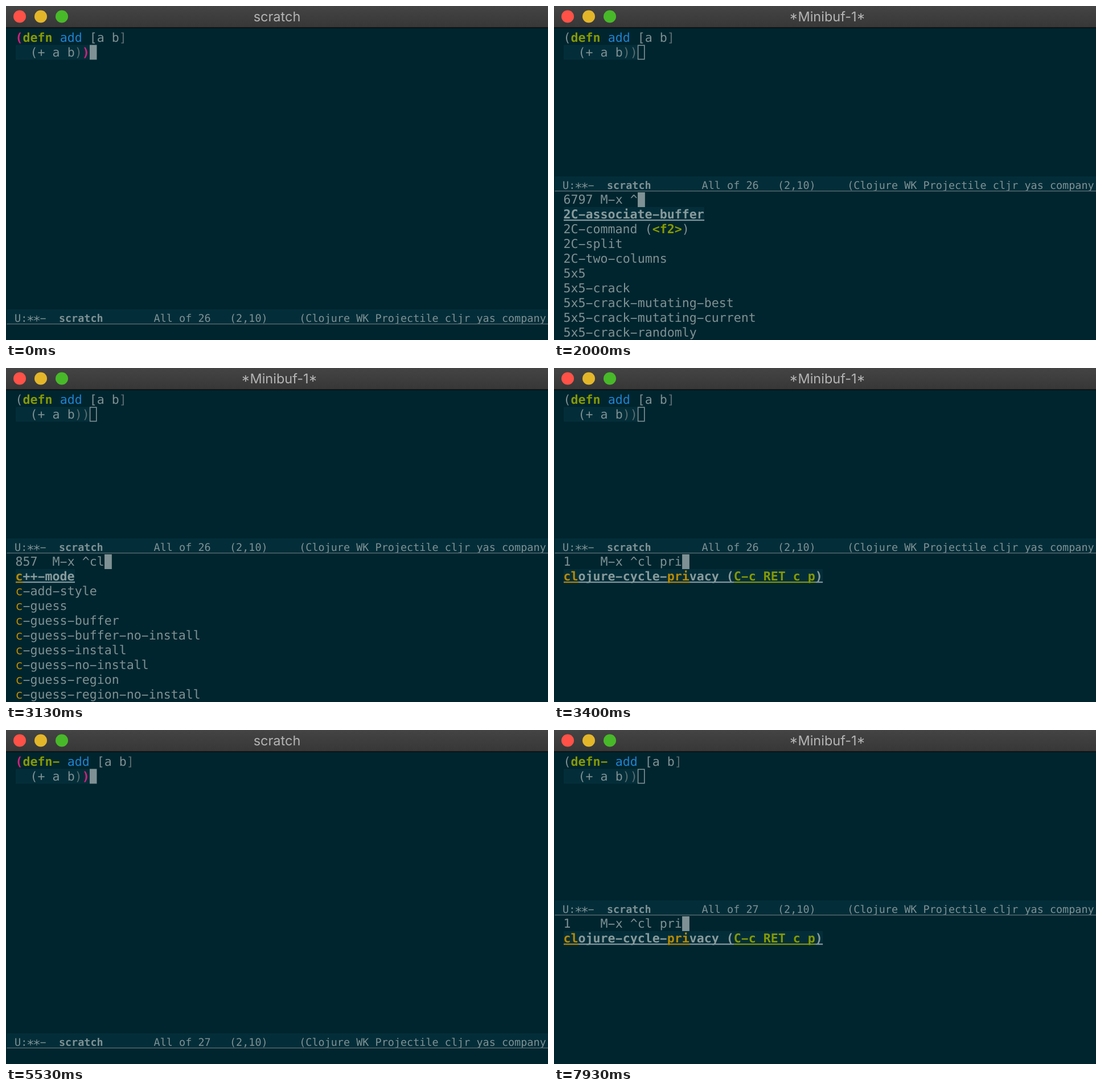
Recreate the animation shown at these times as an HTML page with a canvas. Size 952 by 588 pixels, loop 8000 ms.

```html
<!DOCTYPE html>
<html lang="en">
<head>
<meta charset="utf-8">
<title>scratch</title>
<style>
html, body { margin: 0; width: 100%; height: 100%; overflow: hidden; background: #00252e; }
canvas { display: block; width: 952px; height: 588px; }
</style>
</head>
<body>
<canvas id="stage" width="952" height="588"></canvas>
<script>
const ctx = document.getElementById('stage').getContext('2d');
const LOOP = 8000;
const LEFT = 17, LINE = 26, SIZE = 21.6, BAR_SIZE = 18.46;
const CODE_TOP = 42.5;
const ADVANCE = 0.60205;
const COL = SIZE * ADVANCE;
const MONO = '"DejaVu Sans Mono", monospace';
const C = {
  bg: '#00252e', hl: '#032e39', fg: '#7f9194', bright: '#899b9d', dim: '#5a6c70',
  green: '#869a00', blue: '#1f83d4', pink: '#d4207f', amber: '#b98a02', rule: '#50676e'
};

const OPEN = 1730, CLOSE = 5270, REOPEN = 6930, MATCH_DELAY = 130;
const typing = [[OPEN, '^'], [2670, '^c'], [3130, '^cl'], [3200, '^cl '],
  [3270, '^cl p'], [3330, '^cl pr'], [3400, '^cl pri']];

const allCommands = ['2C-associate-buffer', '2C-command (<f2>)', '2C-split', '2C-two-columns', '5x5',
  '5x5-crack', '5x5-crack-mutating-best', '5x5-crack-mutating-current', '5x5-crack-randomly'];
const cCommands = ['c++-mode', 'c-add-style', 'c-guess', 'c-guess-buffer', 'c-guess-buffer-no-install',
  'c-guess-install', 'c-guess-no-install', 'c-guess-region', 'c-guess-region-no-install'];

function rect(x, y, w, h, color) {
  ctx.fillStyle = color;
  ctx.fillRect(x, y, w, h);
}

// Monospaced text with wide hyphens and large, low asterisks.
function mono(text, x, y, color, bold = false, size = SIZE) {
  const step = size * ADVANCE;
  const setFont = scale => { ctx.font = `${bold ? 'bold ' : ''}${size * scale}px ${MONO}`; };
  ctx.textAlign = 'left';
  ctx.fillStyle = color;
  for (const { 0: part, index } of text.matchAll(/-|\*|[^ \-*]+/g)) {
    const px = x + index * step;
    if (part === '-') {
      const h = size * (bold ? 0.115 : 0.08);
      ctx.fillRect(px + size * 0.05, y - size * 0.29 - h / 2, size * 0.5, h);
    } else if (part === '*') {
      setFont(1.25);
      ctx.fillText(part, px - step * 0.125, y + size * 0.34);
    } else {
      setFont(1);
      ctx.fillText(part, px, y);
    }
  }
}

// Draws [text, color, bold] runs on the line whose top is given.
function runs(list, top, underlined = false) {
  let x = LEFT;
  for (const [text, color, bold] of list) {
    const width = text.length * COL;
    if (underlined) {
      rect(x, top, width, LINE, C.hl);
      rect(x, top + 22, width, 2, color);
    }
    mono(text, x - 0.4, top + 20.2, color, bold);
    x += width;
  }
}

function titleBar(text, center) {
  const shade = ctx.createLinearGradient(0, 0, 0, 38);
  shade.addColorStop(0, '#444444');
  shade.addColorStop(1, '#373737');
  rect(0, 0, 952, 38, shade);
  rect(0, 37.5, 952, 1.5, '#08090a');
  ['#ff5147', '#e3b62a', '#48b929'].forEach((color, i) => {
    ctx.fillStyle = color;
    ctx.beginPath();
    ctx.arc(24 + 37 * i, 18.5, 11, 0, Math.PI * 2);
    ctx.fill();
  });
  ctx.font = '23.5px Inter, sans-serif';
  ctx.textAlign = 'center';
  ctx.fillStyle = '#b4b4b4';
  ctx.fillText(text, center, 27.2);
}

function code(isPrivate, matched, active) {
  const edge = matched ? [C.pink, true] : [C.fg, false];
  const end = matched ? [C.pink, true] : [C.dim, false];
  const second = CODE_TOP + LINE;
  runs([['(', ...edge], [isPrivate ? 'defn-' : 'defn', C.green, true],
    [' add ', C.blue], ['[a b', C.fg], [']', C.dim]], CODE_TOP);
  rect(LEFT, second, 10 * COL, LINE, C.hl);
  runs([['  (+ a b', C.fg], [')', C.dim], [')', ...end]], second);
  if (active) {
    rect(147, second, 12.5, LINE, C.fg);
  } else {
    ctx.strokeStyle = C.fg;
    ctx.lineWidth = 1.6;
    ctx.strokeRect(147.6, second + 0.8, 11.2, 24.4);
  }
}

function modeLine(top, size) {
  const step = BAR_SIZE * ADVANCE;
  const put = (col, text, bold) => mono(text, 4 + col * step, top + 21.8, C.fg, bold, BAR_SIZE);
  ctx.save();
  ctx.beginPath();
  ctx.rect(1.5, top, 951, 27);
  ctx.clip();
  rect(1, top, 951, 27, C.hl);
  put(1, 'U:**-');
  put(8, 'scratch', true);
  put(23, `All of ${size}`);
  put(35, '(2,10)');
  put(46, '(Clojure WK Projectile cljr yas company');
  rect(1, top + 25, 951, 1.7, C.rule);
  rect(1, top + 26.7, 951, 1, C.bg);
  ctx.restore();
}

function candidates(input) {
  const top = i => 354 + LINE * i;
  if (input === '^cl pri') {
    runs([['cl', C.amber, true], ['ojure-cycle-', C.bright, true], ['pri', C.amber, true],
      ['vacy (', C.bright, true], ['C-c RET c p', C.green, true], [')', C.bright, true]], top(0), true);
    return;
  }
  const hit = input === '^' ? 0 : 1;
  (hit ? cCommands : allCommands).forEach((name, i) => {
    const chosen = i === 0;
    const color = chosen ? C.bright : C.fg;
    const [head, key, tail] = name.slice(hit).split(/(<f2>)/);
    const line = [[name.slice(0, hit), C.amber, chosen], [head, color, chosen]];
    if (key) line.push([key, C.green, true], [tail, color, chosen]);
    runs(line, top(i), chosen);
  });
}

function minibuffer(input) {
  const count = input === '^' ? '6797' : input === '^cl pri' ? '1' : '857';
  const prompt = `${count.padEnd(5)}M-x ${input}`;
  runs([[prompt, C.fg]], 328);
  rect(LEFT + prompt.length * COL, 328, 12.8, LINE, C.fg);
  candidates(input);
}

function draw(t) {
  const first = t >= OPEN && t < CLOSE;
  const open = first || t >= REOPEN;
  const isPrivate = t >= CLOSE;
  const switched = [REOPEN, CLOSE, OPEN, -LOOP].find(start => t >= start);
  const matched = open === (t - switched < MATCH_DELAY);

  rect(0, 0, 952, 588, C.bg);
  titleBar(open ? '*Minibuf-1*' : 'scratch', open ? 480 : 476);
  code(isPrivate, matched, !open);
  modeLine(open ? 300 : 534, isPrivate ? 27 : 26);
  if (open) minibuffer(first ? typing.findLast(([start]) => t >= start)[1] : '^cl pri');
}

ctx.textRendering = 'geometricPrecision';
const begin = performance.now();
function tick() {
  draw((performance.now() - begin) % LOOP);
  requestAnimationFrame(tick);
}
tick();
</script>
</body>
</html>
```
